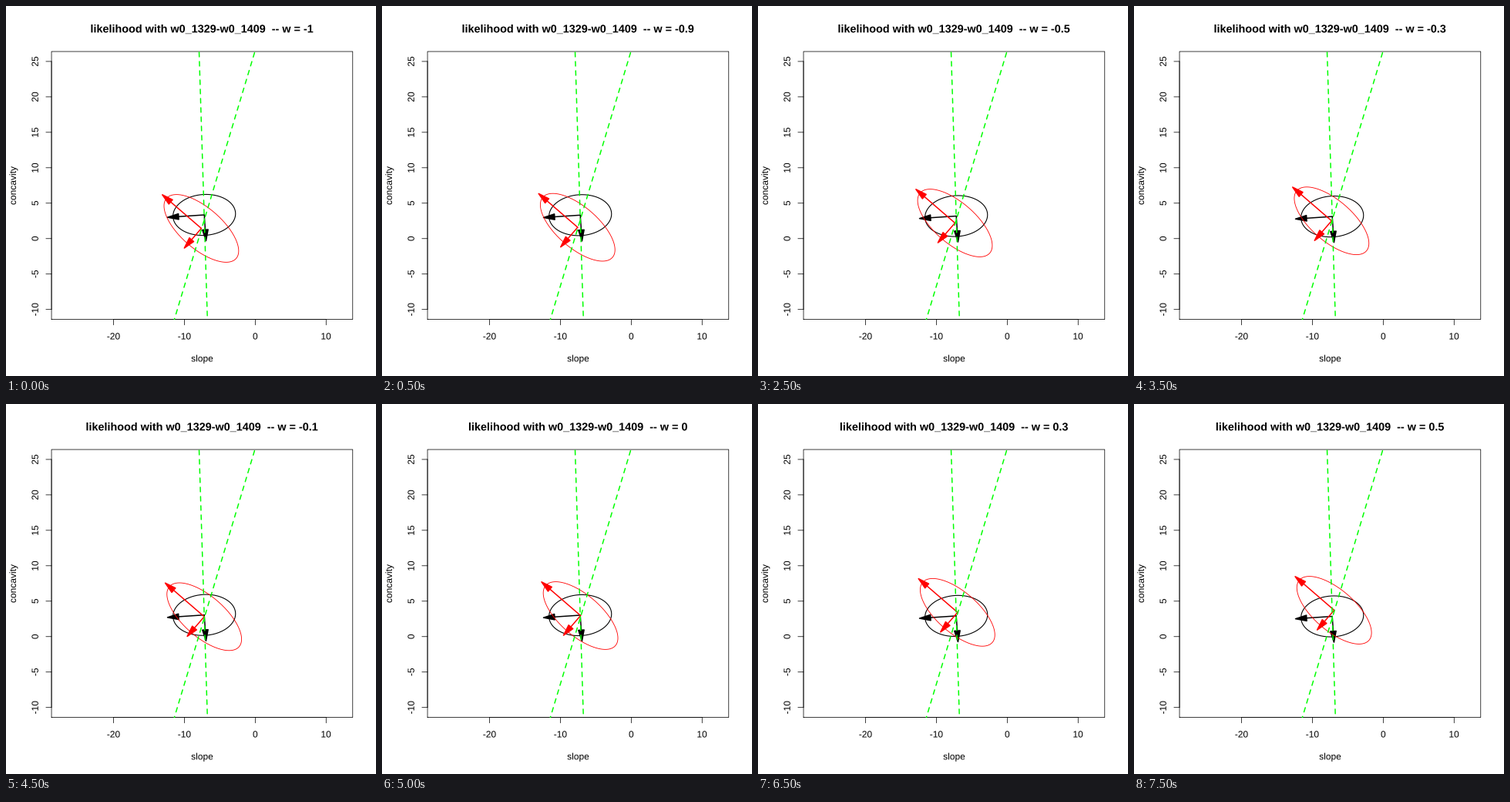
Recreate the animation shown at these times as a matplotlib script. Size 480 by 480 pixels, loop 8000 ms.

```python
import numpy as np
import matplotlib.pyplot as plt
from matplotlib.animation import FuncAnimation
from matplotlib.patches import PathPatch, Rectangle
from matplotlib.textpath import TextPath
from matplotlib.transforms import Affine2D

SIZE = 480
LEFT, TOP, RIGHT, BOTTOM = 59.04, 59.04, 449.76, 406.56
MID_X, MID_Y = (LEFT + RIGHT) / 2, (TOP + BOTTOM) / 2
UNIT = (BOTTOM - TOP) / 37.8           # pixels per data unit
X0, Y0 = MID_X + 7.5 * UNIT, BOTTOM - 11.4 * UNIT
TICK = 7.2
STEPS, INTERVAL = 16, 500

THIN, THICK = 0.75, 1.5
HEAD_LEN, HEAD_HALF = 14.4, 3.7

fig = plt.figure(figsize=(SIZE / 72, SIZE / 72), dpi=72, facecolor="white")
ax = fig.add_axes([0, 0, 1, 1])
ax.set(xlim=(0, SIZE), ylim=(SIZE, 0))
ax.axis("off")


def text_path(x, y, s, size=12, rotation=0, weight="normal"):
    """Outline of s, centred on x (or on y when rotated), on its baseline."""
    font = {"family": "Liberation Sans", "weight": weight}
    path = TextPath((0, 0), s, size=size, prop=font)
    box = path.get_extents()
    place = (Affine2D().translate(-(box.x0 + box.x1) / 2, 0).scale(1, -1)
             .rotate_deg(-rotation).translate(x, y))
    return place.transform_path(path)


def label(*args, **kw):
    patch = PathPatch(text_path(*args, **kw), fc="black", lw=0)
    return ax.add_patch(patch)


def rule(xs, ys):
    ax.plot(xs, ys, color="black", lw=THIN, solid_capstyle="round",
            solid_joinstyle="round", snap=False)


def draw_frame():
    rule([LEFT, RIGHT, RIGHT, LEFT, LEFT], [BOTTOM, BOTTOM, TOP, TOP, BOTTOM])
    # axis lines run over the box between the outermost ticks
    rule([X0 - 20 * UNIT, X0 + 10 * UNIT], [BOTTOM] * 2)
    rule([LEFT] * 2, [Y0 + 10 * UNIT, Y0 - 25 * UNIT])
    for v in range(-20, 11, 10):
        x = X0 + v * UNIT
        rule([x, x], [BOTTOM, BOTTOM + TICK])
        label(x, BOTTOM + 25.92, str(v))
    for v in range(-10, 26, 5):
        y = Y0 - v * UNIT
        rule([LEFT - TICK, LEFT], [y, y])
        label(LEFT - 17.28, y, str(v), rotation=90)
    label(MID_X, BOTTOM + 54.72, "slope")
    label(LEFT - 46.08, MID_Y, "concavity", rotation=90)


def draw_dashed(x_top, x_bottom, y_from, y_to):
    slope = (x_bottom - x_top) / (BOTTOM - TOP)
    ys = np.array([y_from, y_to])
    line, = ax.plot(x_top + slope * (ys - TOP), ys, color="#00ff00", lw=THICK,
                    ls=(0, (4, 4)), dash_capstyle="round", zorder=5)
    line.set_clip_path(Rectangle((LEFT, TOP), RIGHT - LEFT, BOTTOM - TOP,
                                 transform=ax.transData))


class Cloud:
    """Ellipse with an arrow along each of its two axes."""

    def __init__(self, color, center, drift, a, b, tilt, lw, z):
        self.center, self.drift = np.array(center), np.array(drift)
        t = np.radians(tilt)
        major = np.array([-np.cos(t), -np.sin(t)])
        minor = np.array([-np.sin(t), np.cos(t)])
        p = np.linspace(0, 2 * np.pi, 200)[:, None]

        outline, = ax.plot([], [], color=color, lw=lw, zorder=z)
        self.parts = [(outline, a * np.cos(p) * major + b * np.sin(p) * minor)]
        for d, size in ((major, a), (minor, b)):
            shaft, = ax.plot([], [], color=color, lw=THICK, zorder=z,
                             solid_capstyle="round")
            self.parts.append((shaft, np.array([[0, 0], d * size])))

            # the head is centred on the end of the shaft
            side = np.array([-d[1], d[0]]) * HEAD_HALF
            tip, back = d * (size + HEAD_LEN / 2), d * (size - HEAD_LEN / 2)
            pts = np.array([tip, back + side, back - side])
            head, = ax.fill(*pts.T, fc=color, ec=color, lw=THICK, zorder=z,
                            joinstyle="round")
            self.parts.append((head, pts))

    def move(self, i):
        c = self.center + self.drift * i
        for artist, pts in self.parts:
            if hasattr(artist, "set_xy"):
                artist.set_xy(pts + c)
            else:
                artist.set_data(*(pts + c).T)


def title_path(i):
    s = f"likelihood with w0_1329-w0_1409  -- w = {(i - 10) / 10:g}"
    return text_path(MID_X, 34.4, s, size=14.4, weight="bold")


draw_frame()
title = ax.add_patch(PathPatch(title_path(0), fc="black", lw=0))
clouds = [
    Cloud("black", (257.2, 271.0), (0.0, 0.3), 40.6, 26.5, -3.8, 1.1, 3),
    Cloud("red", (253.4, 288.5), (0.42, -1.4), 59.7, 26.6, 40.8, 0.85, 4),
]
draw_dashed(250.5, 261.3, 0, BOTTOM + 10)
draw_dashed(322.9, 218.4, SIZE, TOP - 10)


def update(i):
    title.set_path(title_path(i))
    for cloud in clouds:
        cloud.move(i)
    return []


anim = FuncAnimation(fig, update, frames=STEPS, interval=INTERVAL,
                     init_func=lambda: update(0), repeat=True, repeat_delay=0)
plt.show()
```
